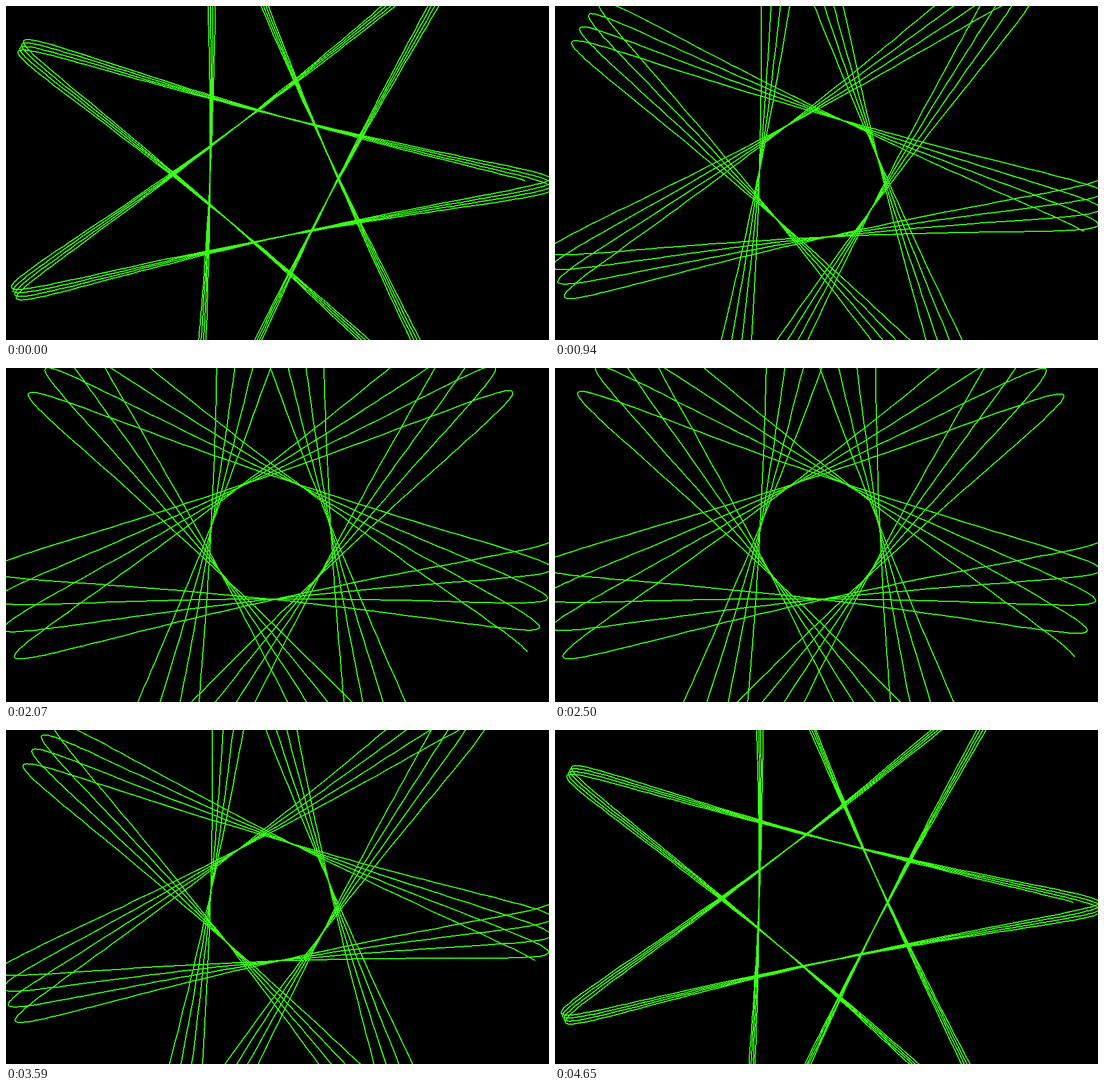
An HTML page that plays this animation: 953x587 px, repeating every 4.68 s.

```html
<!DOCTYPE html>
<html lang="en">
<head>
<meta charset="utf-8">
<title>Spirograph</title>
<style>
  html, body { margin: 0; width: 100%; height: 100%; overflow: hidden; background: #000; }
  svg { display: block; }
  path { fill: none; stroke: #39ff14; stroke-width: 2; stroke-linejoin: round; shape-rendering: crispEdges; }
</style>
</head>
<body>
<svg width="953" height="587" viewBox="0 0 953 587"><path id="curve"/></svg>
<script>
  const curve = document.getElementById('curve');
  const LOOP = 4680;
  const TURN = 2316;   // ms at which the gear starts to fall back
  const STEP = 47.4;   // ms per notch
  const TOP = 49.11;   // highest notch
  const CX = 465, CY = 300;
  const PEN = 301;

  const notch = t => Math.floor(TOP - Math.abs(t - TURN) / STEP);

  function outline(level) {
    const ratio = 0.75098 + 0.0001507 * level;
    const arm = 194.2 + 0.0223 * level;
    const points = Array.from({ length: 2000 }, (_, i) => {
      const a = i * 0.05;
      const x = CX + arm * Math.cos(a) + PEN * Math.cos(ratio * a);
      const y = CY - arm * Math.sin(a) + PEN * Math.sin(ratio * a);
      return Math.round(x) + ' ' + Math.round(y);
    });
    return 'M' + points.join('L');
  }

  let shown = null;
  function tick() {
    const level = notch(performance.now() % LOOP);
    if (level !== shown) curve.setAttribute('d', outline(shown = level));
    requestAnimationFrame(tick);
  }
  tick();
</script>
</body>
</html>
```
